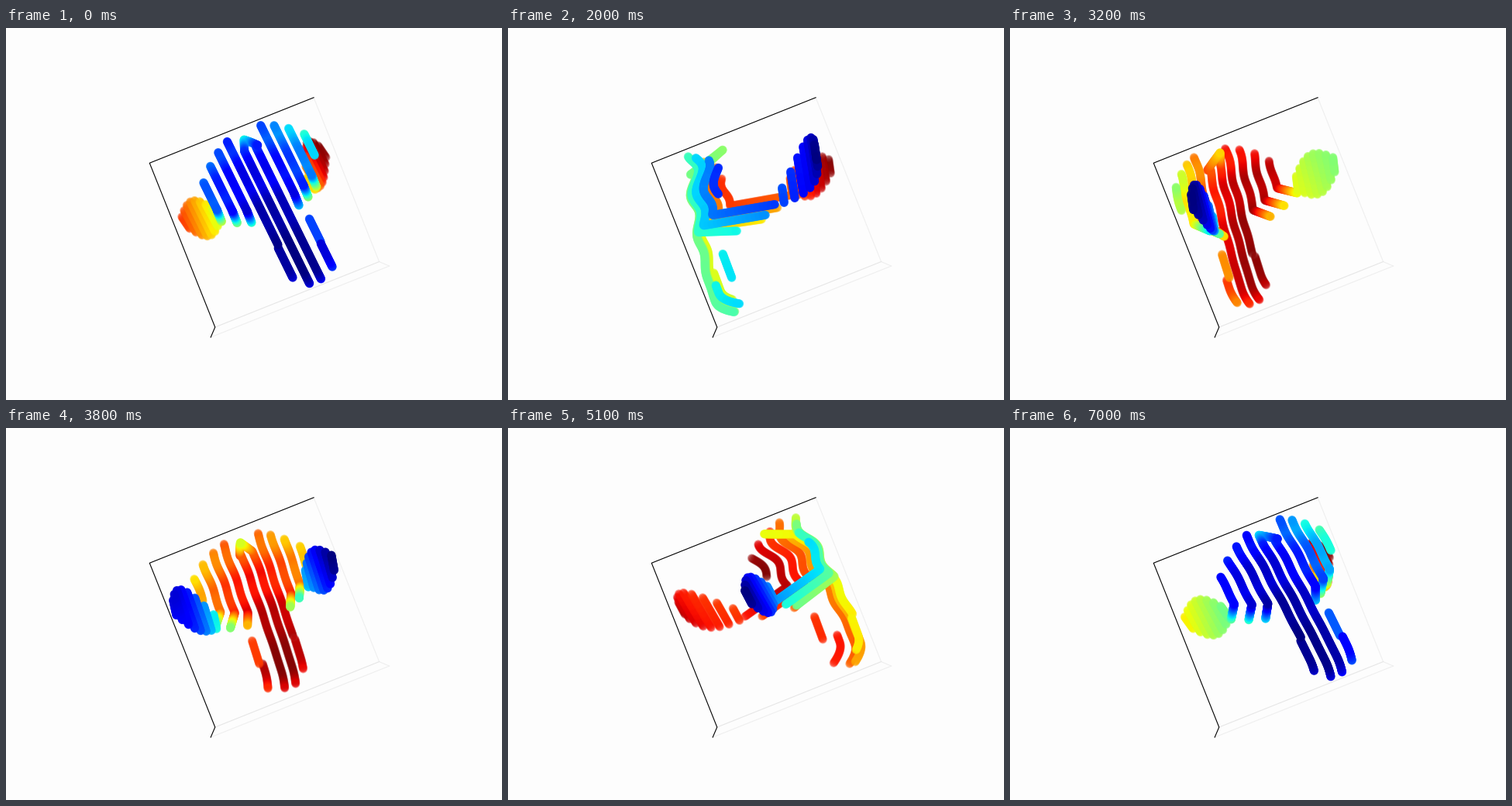
A matplotlib script that plays this animation: 640x480 px, repeating every 7.1 s.

```python
import numpy as np
import matplotlib.pyplot as plt
from matplotlib.animation import FuncAnimation

W, H, DPI = 640, 480, 100
FRAMES, INTERVAL, STEP = 71, 100, np.radians(5)
CENTER = np.array([333.4, 237.9])
TILT = np.radians(21.75)
SCALE, PERSP = 118.8, 0.042    # half box size in pixels, perspective strength
FILL = 0.873                   # share of the box the points span
DEPTH_RATIO = 0.76             # depth extent relative to width
SPACING = 1.3

# Points are (across, up, depth 0 near .. 1 far) as seen from the front.
COLLAR = [(11, 96, .38), (18, 90, .28), (25, 83, .15)]
COLUMNS = 10
LEGS = (4, 5)


def front_depth(k, v):
    t = np.maximum(v + 80, 0) / 185
    lean = 0.18 * t ** 1.6
    bulge = 0.009 * (k - 3.7) ** 2
    ripple = 0.035 * t * np.sin((v - 17) / 8.4)
    foot = 0.0002 * np.maximum(-85 - v, 0) ** 2
    return lean + bulge + ripple + foot


def front(k, top, bottom):
    v = np.linspace(top, bottom, 40)
    u = -59 + 16.2 * k + 0.08 * (top - v)
    return np.column_stack([u, v, front_depth(k, v)])


def column(k):
    """One scan line over the dome, then back along its underside."""
    top = 108 - 1.9 * (k - 4.8) ** 2
    if k in LEGS:
        return np.vstack([COLLAR[:1 if k == 4 else 3], front(k, 82, -106)])
    if k == 3:
        return front(k, top, -45)
    if k == COLUMNS - 1:
        return front(k, top, 44)
    off = (k - 4.2) ** 2
    line = front(k, top, 5 + 1.2 * off)
    back = line[-1] + [0, -17, min(0.38, 0.07 * off)]
    return np.vstack([line, back])


def leg(u, top, bottom, depth):
    v = np.linspace(top, bottom, 12)
    curl = 0.0002 * np.maximum(-75 - v, 0) ** 2
    return np.column_stack([u + 0.08 * (top - v), v, depth + curl])


def blob(u0, u1, mid, depth, n=8):
    """A rounded patch of upright scan lines between two sides."""
    t = np.linspace(0, 1, n)
    half = 9 + 16 * np.sin(np.pi * t)
    for u, c, h, d in zip(u0 + (u1 - u0) * t, mid(t), half, depth(t)):
        yield [(u - 2, c + h, d + 0.001 * h), (u + 2, c - h, d - 0.001 * h)]


def unproject(points):
    u, v, d = np.asarray(points, float).T
    near = FILL * (1 - 2 * d)
    k = (1 - PERSP * near) / SCALE
    return np.column_stack([u * k, v * k, DEPTH_RATIO * near])


def resample(line):
    p = unproject(line)
    length = np.linalg.norm(np.diff(p, axis=0), axis=1) * SCALE
    s = np.concatenate([[0], np.cumsum(length)])
    at = np.linspace(0, s[-1], max(2, int(s[-1] / SPACING) + 1))
    return np.column_stack([np.interp(at, s, p[:, i]) for i in range(3)])


def project(u, v, near):
    k = SCALE / (1 - PERSP * np.asarray(near, float))
    u, v = u * k, v * k
    c, s = np.cos(TILT), np.sin(TILT)
    return np.column_stack([CENTER[0] + c * u - s * v, CENTER[1] - s * u - c * v])


def fit(a):
    lo, hi = a.min(), a.max()
    return FILL * (2 * a - lo - hi) / (hi - lo)


lines = [column(k) for k in range(COLUMNS)]
lines += [leg(0, -49, -91, 0.03), leg(52, -29, -62, 0.19), leg(54, -64, -97, 0.08)]
lines += blob(-59, -100, lambda t: 21 + 4 * t, lambda t: 0.62 + 0.23 * t)
lines += blob(71, 100, lambda t: 12 + 33 * np.sin(np.pi * t / 2),
              lambda t: 1 - 0.31 * (1 - t) ** 2)
cloud = np.vstack([resample(line) for line in lines])
height = fit(cloud[:, 1])

fig = plt.figure(figsize=(W / DPI, H / DPI), dpi=DPI, facecolor="#fdfdfd")
ax = fig.add_axes([0, 0, 1, 1])
ax.set_xlim(0, W)
ax.set_ylim(H, 0)
ax.axis("off")


def edge(corners, color):
    xy = project(*np.array(corners, float).T)
    ax.plot(xy[:, 0], xy[:, 1], color=color, lw=0.8, zorder=1)


edge([(1, 1, -1), (1, -1, -1), (1, -1, 1)], "#efefef")
edge([(-1, -1, 1), (1, -1, 1)], "#efefef")
edge([(-1, -1, -1), (1, -1, -1)], "#e6e6e6")
edge([(1, 1, -1), (-1, 1, -1), (-1, -1, -1), (-1, -1, 1)], "black")

dots = ax.scatter(np.zeros(len(cloud)), np.zeros(len(cloud)), s=42, lw=1.5, zorder=2)


def update(frame):
    c, s = np.cos(frame * STEP), np.sin(frame * STEP)
    x, z = cloud[:, 0], cloud[:, 2]
    across, near = fit(x * c - z * s), fit(x * s + z * c)
    order = np.argsort(near)
    depth = (1 - near[order] / FILL) / 2
    rgba = plt.cm.jet(depth)
    rgba[:, 3] = 1 - 0.7 * depth    # far points fade
    dots.set_offsets(project(across[order], height[order], near[order]))
    dots.set_facecolor(rgba)
    dots.set_edgecolor(rgba)
    return (dots,)


anim = FuncAnimation(fig, update, frames=FRAMES, interval=INTERVAL,
                     repeat=True, repeat_delay=0)
plt.show()
```
